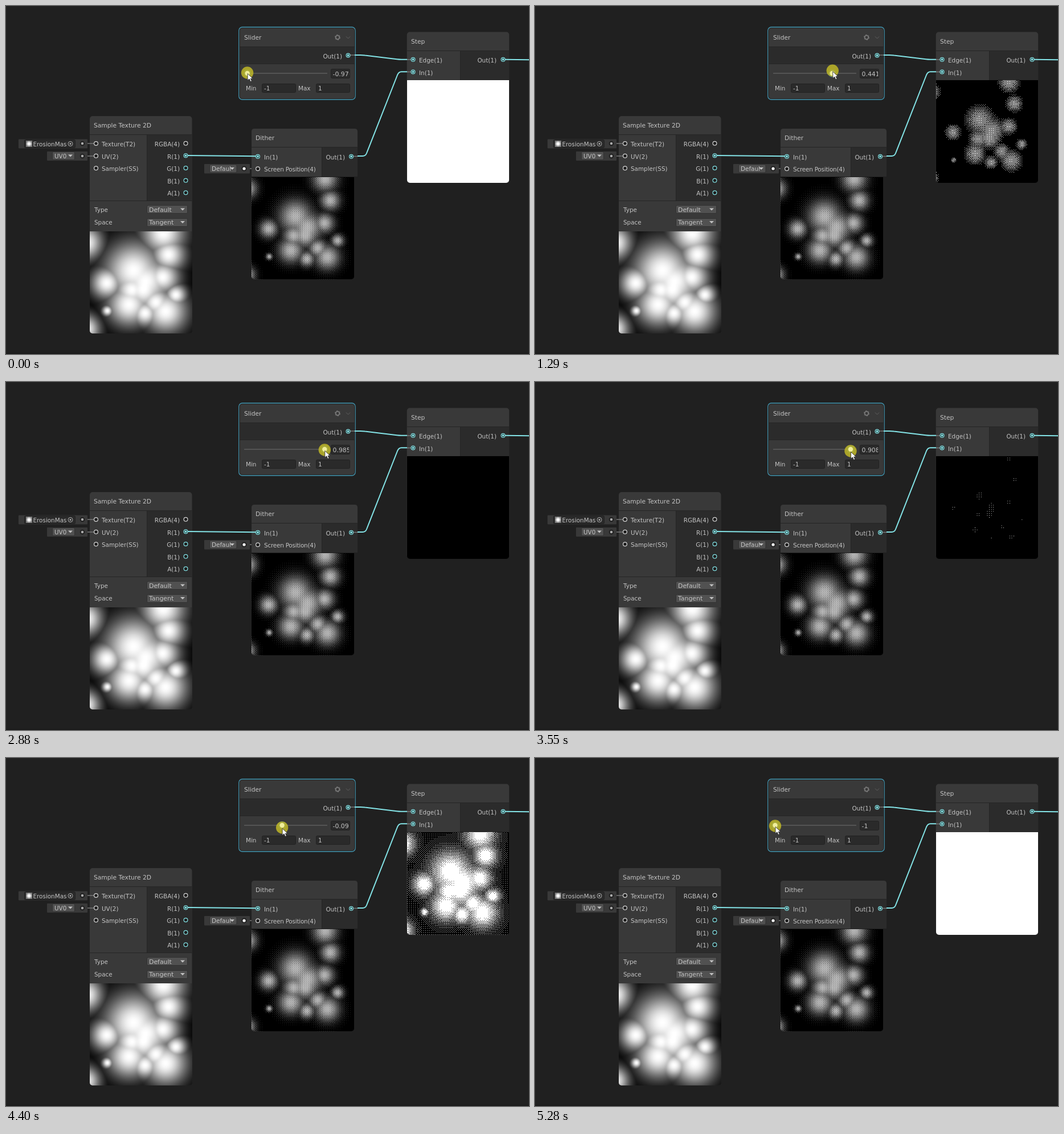
These frames come from a looping animation (918 px wide and 610 px high, 5310 ms). An HTML page with a canvas:

```html
<!DOCTYPE html>
<html lang="en">
<head>
<meta charset="utf-8">
<title>Dither threshold graph</title>
<style>
html, body { margin: 0; width: 100%; height: 100%; overflow: hidden; background: #202020; }
svg, canvas { position: absolute; display: block; }
svg { left: 0; top: 0; }
canvas { width: 179.5px; height: 179.5px; border-radius: 0 0 5px 5px; }
#mask { left: 147px; top: 394.5px; }
#dither { left: 431px; top: 299.5px; }
#step { left: 703.7px; top: 130px; }
text { font: 10.4px "DejaVu Sans", Verdana, sans-serif; fill: #c4c4c4; }
.title { font-size: 10.7px; }
.drop { font-size: 10.9px; }
.end { text-anchor: end; }
.node { fill: #393939; }
.side { fill: #2b2b2b; }
.rule { stroke: #252525; }
.field { fill: #2a2a2a; stroke: #212121; }
.menu { fill: #515151; stroke: #303030; }
.wire { fill: none; stroke: #84e4e7; stroke-width: 2; stroke-linejoin: round; }
.stub { stroke: #777; stroke-width: 1.5; }
.icon { fill: none; stroke: #777; }
</style>
</head>
<body>
<svg width="918" height="610" viewBox="0 0 918 610">
  <defs>
    <g id="open"><circle r="3.4" fill="#1e1e1e" stroke="currentColor" stroke-width="1.2"/></g>
    <g id="linked"><use href="#open"/><circle r="1.9" fill="currentColor"/></g>
    <path id="down" d="M-4-2H4L0 2Z" fill="#c4c4c4"/>
    <radialGradient id="thumb"><stop offset=".3" stop-color="#fff"/><stop offset="1" stop-color="#777"/></radialGradient>
    <clipPath id="valueClip"><rect x="572" y="111" width="30.3" height="16"/></clipPath>
  </defs>
  <rect y="608" width="918" height="2" fill="#1a1a1a"/>

  <!-- Sample node -->
  <rect class="node" x="147" y="193" width="179.5" height="381" rx="5"/>
  <rect class="side" x="248" y="226" width="78.5" height="115"/>
  <path class="rule" d="M147 225.5H326.5M147 341.5H326.5M247.5 226V341"/>
  <text class="title" x="154" y="213">Sample Texture 2D</text>
  <text x="168" y="246">Texture(T2)</text>
  <text x="168" y="267.5">UV(2)</text>
  <text x="168" y="289">Sampler(SS)</text>
  <g class="end">
    <text x="305" y="246">RGBA(4)</text>
    <text x="305" y="267.5">R(1)</text>
    <text x="305" y="289">G(1)</text>
    <text x="305" y="310.5">B(1)</text>
    <text x="305" y="332">A(1)</text>
  </g>
  <text x="155" y="360.5">Type</text>
  <text x="155" y="383">Space</text>
  <rect class="menu" x="247.5" y="349.5" width="71" height="14" rx="2"/>
  <rect class="menu" x="247.5" y="372.5" width="71" height="14" rx="2"/>
  <text class="drop" x="251" y="360.5">Default</text>
  <text class="drop" x="251" y="383">Tangent</text>
  <use href="#down" x="310" y="356.5"/>
  <use href="#down" x="310" y="379"/>

  <!-- Input chips -->
  <rect class="node" x="22" y="233.500" width="121" height="16" rx="1"/>
  <rect class="field" x="32.500" y="234.500" width="89" height="14" rx="2"/>
  <rect x="35" y="236" width="11" height="11" fill="url(#thumb)"/>
  <text x="47.500" y="246">ErosionMas</text>
  <circle class="icon" cx="113" cy="241.500" r="4" style="stroke:#b0b0b0"/>
  <circle cx="113" cy="241.500" r="1.5" fill="#b0b0b0"/>
  <rect class="node" x="72" y="255" width="71" height="16" rx="1"/>
  <rect class="menu" x="81.500" y="255.500" width="39" height="14" rx="2"/>
  <text x="85" y="266.500">UV0</text>
  <use href="#down" x="113" y="262.500"/>
  <rect class="node" x="348" y="277" width="80" height="16.500" rx="1"/>
  <rect class="menu" x="357.500" y="278" width="47.500" height="14" rx="2"/>
  <text x="361" y="289">Defaul</text>
  <use href="#down" x="397" y="285"/>
  <path class="stub" d="M143 241H154M143 263H154M428 285H438"/>
  <g stroke="#202020" stroke-width="2">
    <circle cx="134" cy="241" r="3.300" fill="#aaa"/>
    <circle cx="134" cy="263" r="3.300" fill="#aaa"/>
    <circle cx="418" cy="285" r="3.600" fill="#fff"/>
  </g>

  <!-- Dither node -->
  <path class="node" d="M436 215H612Q617 215 617 220V299H431V220Q431 215 436 215Z"/>
  <rect class="side" x="555" y="248" width="62" height="51"/>
  <path class="rule" d="M431 247.500H617M554.500 248V299"/>
  <text class="title" x="438" y="235">Dither</text>
  <text x="453" y="268.500">In(1)</text>
  <text x="453" y="290" style="letter-spacing:-.2px">Screen Position(4)</text>
  <text class="end" x="595" y="268.500">Out(1)</text>

  <!-- Step node -->
  <rect class="node" x="703.700" y="45.500" width="179.500" height="263" rx="5"/>
  <rect class="side" x="798" y="79" width="85.200" height="51"/>
  <path class="rule" d="M704 78.500H883M797.500 79V130"/>
  <text class="title" x="711" y="65.500">Step</text>
  <text x="725" y="99">Edge(1)</text>
  <text x="725" y="120.500">In(1)</text>
  <text class="end" x="861" y="99">Out(1)</text>

  <!-- Slider node -->
  <rect x="408.700" y="37" width="204.500" height="127" rx="6" fill="#393939" stroke="#3f92ad" stroke-width="1.300"/>
  <rect x="410" y="38.500" width="202" height="124" rx="5" fill="none" stroke="#252525"/>
  <rect class="side" x="410.500" y="72" width="201" height="29"/>
  <path class="rule" d="M410 71.500H612M410 101.500H612"/>
  <text class="title" x="418" y="58.500">Slider</text>
  <circle class="icon" cx="582" cy="55" r="3.300" stroke-width="1.800"/>
  <circle class="icon" cx="582" cy="55" r="4.600" stroke-dasharray="2.400 2.400"/>
  <path class="icon" d="M597 53.500L600.500 57 604 53.500" style="stroke:#606060"/>
  <text class="end" x="590" y="91.500">Out(1)</text>
  <path d="M418 118H564" stroke="#5e5e5e" stroke-width="1.600"/>
  <rect class="field" x="570.500" y="110.500" width="33" height="16" rx="2"/>
  <text id="value" class="drop" x="573.500" y="122.500" clip-path="url(#valueClip)">-0.97</text>
  <text x="421" y="148">Min</text>
  <rect class="field" x="449.500" y="136.500" width="59" height="15" rx="2"/>
  <text x="453" y="148">-1</text>
  <text x="513" y="148">Max</text>
  <rect class="field" x="544.500" y="136.500" width="59" height="15" rx="2"/>
  <text x="548" y="148">1</text>

  <!-- Wires and ports -->
  <path class="stub" d="M604 86H613M610 263.500H618M704 94H711M704 115.500H711"/>
  <path class="wire" d="M612 86H622Q626 86 630 86.600L686 93.200Q690 93.700 694 93.700H704M876 93.700L918 94.300M319 262L438 263.300M617 263H626Q631 263 633 258L687 121Q689.500 115.300 694 115.300H704"/>
  <g color="#84e4e7">
    <use href="#linked" x="600.500" y="86.500"/>
    <use href="#linked" x="714.500" y="93.700"/>
    <use href="#linked" x="714.500" y="115.500"/>
    <use href="#linked" x="872.500" y="93.700"/>
    <use href="#linked" x="315.500" y="262.300"/>
    <use href="#linked" x="442" y="263.700"/>
    <use href="#linked" x="606" y="263.700"/>
    <use href="#open" x="315.500" y="284"/>
    <use href="#open" x="315.500" y="305.700"/>
    <use href="#open" x="315.500" y="327.300"/>
  </g>
  <g color="#d8d8d8">
    <use href="#open" x="158" y="241"/>
    <use href="#open" x="158" y="262.700"/>
    <use href="#open" x="158" y="284.300"/>
    <use href="#open" x="315.500" y="240.700"/>
    <use href="#open" x="442" y="285.300"/>
  </g>

  <circle id="halo" cy="118" r="7" fill="#34617f"/>
  <circle id="spot" r="10.700" fill="#c4bc26" fill-opacity=".82"/>
  <circle id="knob" cy="118" r="4.200" fill="#f0ee9c"/>
  <path id="arrow" d="M0 0V12L3 9.300 5 14 7.200 13 5.200 8.700H9Z" fill="#fff" stroke="#222" stroke-width=".8"/>
</svg>
<canvas id="mask"></canvas>
<canvas id="dither"></canvas>
<canvas id="step"></canvas>

<script>
const LOOP = 5310, N = 200;
const el = id => document.getElementById(id);

// Soft spots: x, y, spread
const spots = [
  [77, 69, 24], [98, 88, 22], [74, 103, 15], [94, 103, 17], [69, 129, 18], [116, 125, 13],
  [133, 141, 18], [97, 144, 11], [128, 81, 14], [138, 41, 14], [129, 3, 18], [30, 91, 13],
  [151, 112, 9], [31, 140, 4.5], [-7.6, 20, 14], [-8, 172, 12]
];

// Drag path: time, slider value, pointer y, pointer offset from knob
const drag = [
  [20, -.97, 117, 0], [520, -.24, 113, 2], [600, -.24, 113, 2], [720, -.07, 113, 2],
  [1140, .34, 113, 1], [1660, .69, 114, 0], [1760, .69, 118, 0], [1970, .8185, 118, 0],
  [2260, .93, 119, 0], [2310, .93, 119, 0], [2590, .985, 119, 0], [2880, .985, 119, 0],
  [2990, 1, 119, 0], [3320, 1, 119, 0], [3550, .9095, 121, 0], [3850, .62, 121, 0],
  [4070, .3635, 121, 0], [4400, -.09, 122, 0], [4750, -.465, 123, 0], [4960, -.66, 122, 0],
  [5280, -1, 119, 0]
];

const bayer = [1, 9, 3, 11, 13, 5, 15, 7, 4, 12, 2, 10, 16, 8, 14, 6];

function maskAt(x, y) {
  let sum = 0;
  for (const [sx, sy, s] of spots) {
    sum += Math.exp(-4 * ((x - sx) ** 2 + (y - sy) ** 2) / (s * s));
  }
  return Math.min(1, sum ** (1 / 8));
}

const field = new Float32Array(N * N), dithered = new Float32Array(N * N);
for (let i = 0; i < N * N; i++) {
  const x = i % N, y = i / N | 0;
  field[i] = maskAt((x + .5) * 180 / N, (y + .5) * 180 / N);
  dithered[i] = field[i] - bayer[x % 4 * 4 + (N - 1 - y) % 4] / 17;
}

function painter(id) {
  const canvas = el(id);
  canvas.width = canvas.height = N;
  const ctx = canvas.getContext('2d'), image = ctx.createImageData(N, N);
  const pixels = new Uint32Array(image.data.buffer);
  return shade => {
    for (let i = 0; i < pixels.length; i++) pixels[i] = 0xff000000 | shade(i) * 0x10101;
    ctx.putImageData(image, 0, 0);
  };
}

const display = v => Math.round(255 * Math.max(0, v) ** (1 / 2.2));
painter('mask')(i => display(field[i]));
painter('dither')(i => display(dithered[i]));
const paintStep = painter('step');

function poseAt(t) {
  const n = drag.findIndex(k => k[0] > t);
  if (n === 0) return drag[0];
  if (n < 0) return drag[drag.length - 1];
  const a = drag[n - 1], b = drag[n], p = (t - a[0]) / (b[0] - a[0]);
  return a.map((v, i) => v + (b[i] - v) * p);
}

// The field truncates rather than rounds
const label = v => Math.abs(v) === 1 ? String(v) : (Math.trunc(v * 1000) / 1000).toFixed(3);

let lastValue;
function draw(now) {
  const [, v, y, dx] = poseAt(now % LOOP);
  const x = 421.5 + (v + 1) * 69.4;
  el('halo').setAttribute('cx', x);
  el('knob').setAttribute('cx', x);
  el('spot').setAttribute('transform', `translate(${x + dx} ${y})`);
  el('arrow').setAttribute('transform', `translate(${x + dx + .5} ${y + 1.5})`);
  if (v !== lastValue) {
    lastValue = v;
    el('value').textContent = label(v);
    paintStep(i => dithered[i] >= v ? 255 : 0);
  }
}

const start = performance.now();
function tick() {
  draw(performance.now() - start);
  requestAnimationFrame(tick);
}
tick();
</script>
</body>
</html>
```
